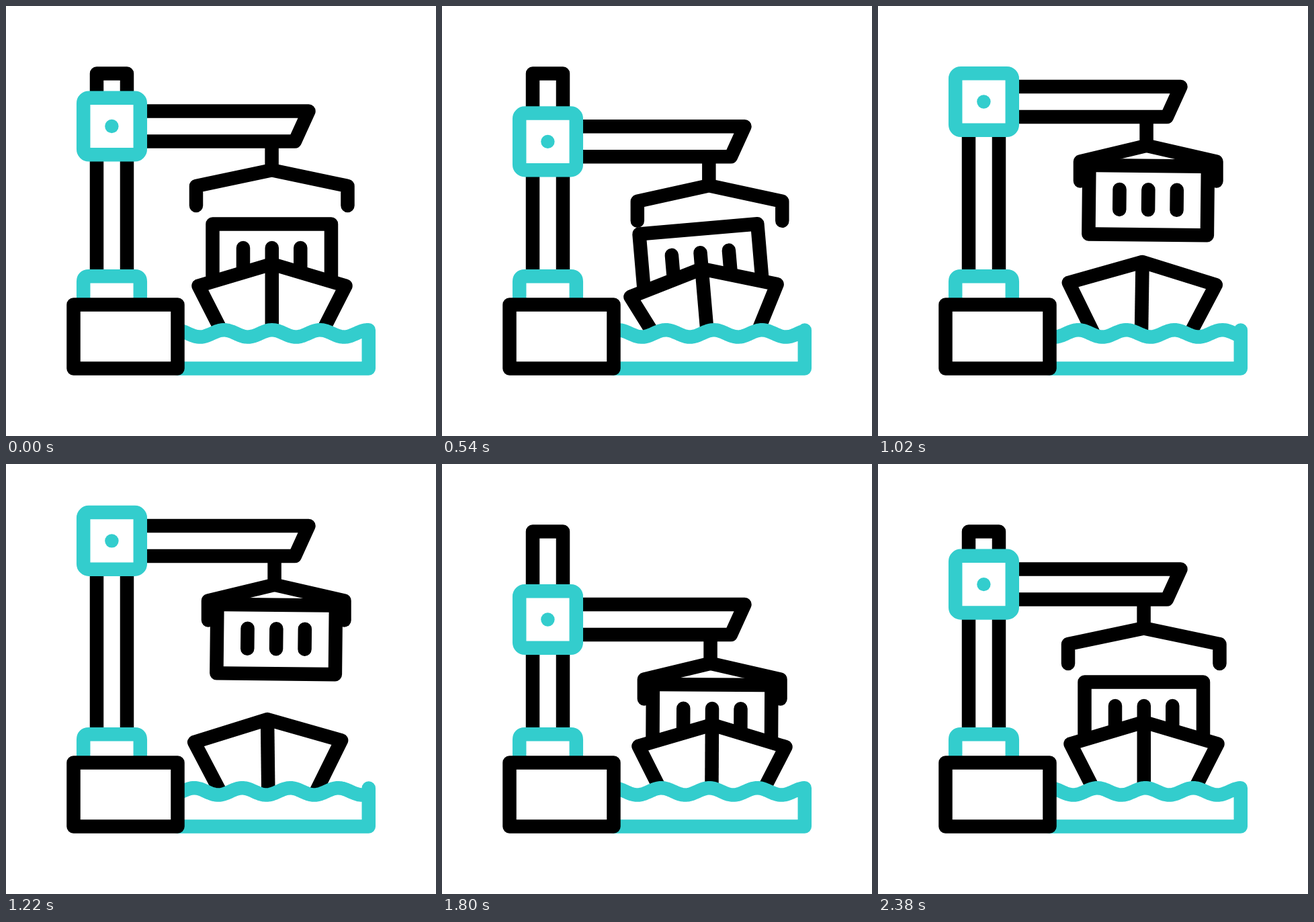
Write an HTML page that moves like this. It is 640 px wide and 640 px high and loops after 2400 ms.

```html
<!DOCTYPE html>
<html lang="en">
<head>
<meta charset="utf-8">
<title>Harbour crane</title>
<style>
  html, body { margin: 0; width: 100%; height: 100%; overflow: hidden; background: #fff; }
  svg { display: block; width: 100%; height: 100%; }
  svg * { stroke-linejoin: round; }
  .ink, .sea { fill: #fff; stroke: #000; stroke-width: 20.5; }
  .sea { stroke: #33cdcd; }
  .bare { fill: none; }
  .cap { stroke-linecap: round; }
</style>
</head>
<body>
<svg viewBox="0 0 640 640">
  <path class="ink" d="M135 420V100.5H180V420"/>

  <g id="box">
    <rect class="ink" x="307.5" y="324.5" width="176.5" height="102.5"/>
    <path class="ink cap" d="M353 360V390M395.8 360V390M438.3 360V390"/>
  </g>

  <g id="hull">
    <path class="ink" d="M395.8 384L505.5 416.5L463 500H329L286.5 416.5Z"/>
    <path class="ink" d="M395.8 384V500"/>
  </g>

  <path id="water" class="sea cap"/>

  <path class="sea" d="M115.2 445V410Q115.2 402.2 123 402.2H192Q199.8 402.2 199.8 410V445"/>
  <rect class="ink" x="100.5" y="444.5" width="155" height="95"/>

  <g id="crane">
    <path id="arms" class="ink bare cap"/>
    <path id="rod" class="ink"/>
    <path class="ink" d="M190 156.5H450.5L430 201.5H190"/>
    <rect class="sea" x="115.2" y="136.7" width="84.6" height="84.6" rx="8"/>
    <circle cx="157.4" cy="179" r="10.2" fill="#33cdcd"/>
  </g>
</svg>
<script>
const LOOP = 2400;
const $ = id => document.getElementById(id);

// Monotone cubic through x, y pairs; flat at both ends.
function curve(...pts) {
  const n = pts.length - 1;
  const sec = i => (pts[i + 1][1] - pts[i][1]) / (pts[i + 1][0] - pts[i][0]);
  const tan = pts.map((_, i) => {
    if (i === 0 || i === n) return 0;
    const a = sec(i - 1), b = sec(i);
    return a * b > 0 ? 2 * a * b / (a + b) : 0;
  });
  return x => {
    let i = 0;
    while (i < n - 1 && x > pts[i + 1][0]) i++;
    const [x0, y0] = pts[i], [x1, y1] = pts[i + 1];
    const w = x1 - x0, u = (x - x0) / w, v = 1 - u;
    return y0 * v * v * (1 + 2 * u) + y1 * u * u * (3 - 2 * u)
      + w * u * v * (tan[i] * v - tan[i + 1] * u);
  };
}

// Clock time to story progress: the pace surges at pick-up and set-down.
const pace = curve([-20, -.0055], [0, 0], [200, .05], [400, .108], [540, .175],
  [700, .31], [860, .408], [1080, .492], [1220, .524], [1540, .601], [1620, .629],
  [1700, .69], [1800, .794], [2000, .893], [2180, .942], [2380, .9945],
  [2400, 1], [2420, 1.0055]);

const GRAB = .325, DROP = .785;
const lift = curve([0, 0], [.05, 0], [GRAB, 52.5], [.55, -69], [DROP, 52.8], [1, 0]);
const grip = curve([0, 0], [.05, 0], [GRAB, 1], [DROP, 1], [1, 0]);
const shipX = curve([0, 0], [.175, -6.5], [GRAB, 6], [.408, 2.5], [.55, -7], [DROP, 6], [1, 0]);
const shipY = curve([0, 0], [.175, 7], [GRAB, 2.3], [.408, -1.5], [.55, -4], [DROP, 4], [1, 0]);
const tilt = curve([0, 0], [.175, -4.9], [GRAB, .6], [.408, 3.2], [.524, -.7], [.601, -.1], [DROP, .3], [1, 0]);

function pose(id, x, y, deg) {
  $(id).setAttribute("transform", `translate(${x} ${y}) rotate(${deg} 396 416)`);
}

function wave(crest) {
  let d = "M255 539.5H539.8V482.5";
  for (let x = 539.8; x > 250; x -= 3) {
    const y = 487.4 - 5.2 * Math.cos((x - crest) / 71.5 * 2 * Math.PI);
    d += `L${x.toFixed(1)} ${y.toFixed(2)}`;
  }
  return d;
}

function draw() {
  const s = pace(performance.now() % LOOP);
  const y = lift(s), g = grip(s);

  $("crane").setAttribute("transform", `translate(0 ${y})`);
  const left = 283 + 18 * g, mid = 395.6 + 4 * g, right = 508.5 - 5 * g;
  $("rod").setAttribute("d", `M${mid} 202V244`);
  $("arms").setAttribute("d", `M${left} 297V268L${mid} 244.3L${right} 268V297`);

  const ship = [shipX(s), shipY(s), tilt(s)];
  pose("hull", ...ship);
  if (s > GRAB && s < DROP) {
    const settle = Math.max(0, (s - .65) / (DROP - .65));
    pose("box", 6, y - 50.2 + 1.4 * settle, .6 - .3 * settle);
  } else {
    pose("box", ...ship);
  }

  $("water").setAttribute("d", wave(396 - 5 * 71.5 * s));
  requestAnimationFrame(draw);
}
draw();
</script>
</body>
</html>
```
